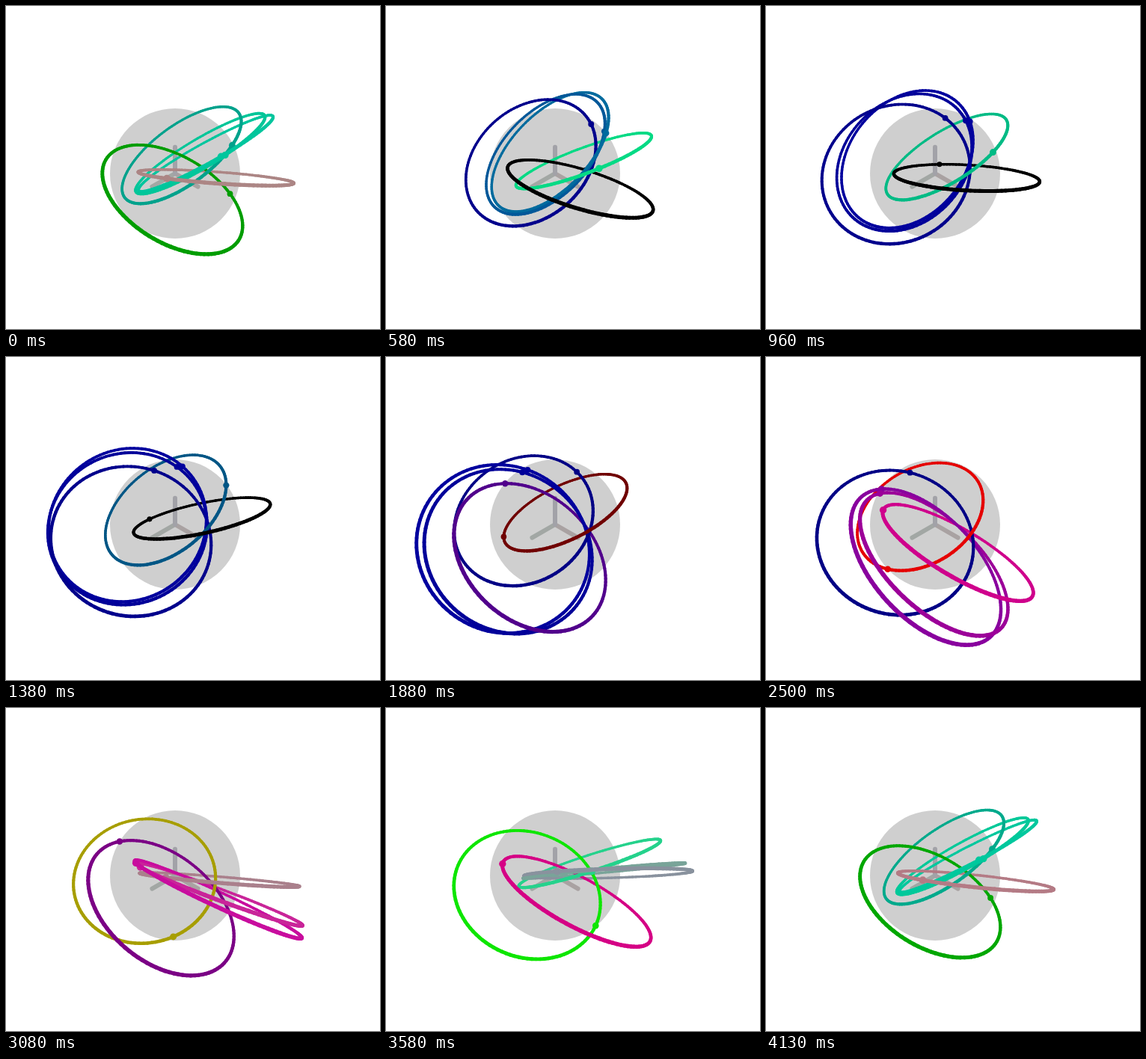
Animation of 500x432 px, one loop 4180 ms. Source, as an HTML page with a canvas:

```html
<!DOCTYPE html>
<html lang="en">
<head>
<meta charset="utf-8">
<title>Linked circles</title>
<style>
html, body { margin: 0; width: 100%; height: 100%; overflow: hidden; background: #fff; }
canvas { display: block; }
</style>
</head>
<body>
<canvas id="stage" width="500" height="432"></canvas>
<script>
const ctx = document.getElementById('stage').getContext('2d');
const LOOP = 4180, STEPS = 100, FPS = 24;
const CX = 226, CY = 224, RADIUS = 87;
const DIST = 5.5, FOCAL = RADIUS * Math.sqrt(DIST * DIST - 1);
const TUBE = 0.048, PARTS = 120;

// Start longitude in degrees and constant height of each point on the unit sphere
const points = [[137, -0.43], [38, 0.52], [130.5, 0.55], [104, 0.6], [97.3, 0.62]];
const axes = [[[0.48, 0, 0], '#a2a7a4'], [[0, 0.48, 0], '#a9a2a2'], [[0, 0, 0.48], '#a2a2a8']];

// Isometric view along (1,1,1) with perspective
function project([x, y, z]) {
  const depth = (x + y + z) / Math.sqrt(3);
  const scale = FOCAL / (DIST - depth);
  return {
    x: CX + (y - x) / Math.SQRT2 * scale,
    y: CY - (2 * z - x - y) / Math.sqrt(6) * scale,
    depth, scale
  };
}

function line(a, b, width, color) {
  ctx.strokeStyle = color;
  ctx.lineWidth = width;
  ctx.beginPath();
  ctx.moveTo(a.x, a.y);
  ctx.lineTo(b.x, b.y);
  ctx.stroke();
}

function disc(x, y, r, color) {
  ctx.fillStyle = color;
  ctx.beginPath();
  ctx.arc(x, y, r, 0, 2 * Math.PI);
  ctx.fill();
}

// Hopf fibre through m and -m: a circle of radius 1/r in the plane of m and n
function addRing(items, [start, z], turn) {
  const lon = (start + turn) * Math.PI / 180, r = Math.sqrt(1 - z * z);
  const m = [r * Math.cos(lon), r * Math.sin(lon), z];
  const n = [Math.sin(lon), -Math.cos(lon), 0];
  const color = `rgb(${m.map(v => Math.round(255 * Math.max(0, v))).join()})`;
  const at = i => {
    const a = 2 * Math.PI * i / PARTS;
    return project(m.map((v, k) => (v * Math.cos(a) + n[k] * (Math.sin(a) - z)) / r));
  };
  let a = at(0);
  for (let i = 1; i <= PARTS; i++) {
    const p = a, q = at(i);
    const width = TUBE * (p.scale + q.scale) / 2;
    items.push({ depth: (p.depth + q.depth) / 2, draw: () => line(p, q, width, color) });
    a = q;
  }
  const dot = project(m);
  items.push({ depth: dot.depth, draw: () => disc(dot.x, dot.y, TUBE * dot.scale, color) });
}

function draw(step) {
  ctx.fillStyle = '#fff';
  ctx.fillRect(0, 0, 500, 432);
  ctx.lineCap = 'round';
  disc(CX, CY, RADIUS, '#cfcfcf');
  const origin = project([0, 0, 0]);
  for (const [tip, color] of axes) line(origin, project(tip), 6, color);

  const items = [];
  for (const p of points) addRing(items, p, step * 360 / STEPS);
  items.sort((a, b) => a.depth - b.depth);
  for (const item of items) item.draw();
}

const begin = performance.now();
function tick() {
  const t = Math.max(0, performance.now() - begin) % LOOP;
  draw(Math.min(STEPS - 1, Math.floor((t + 4.9) * FPS / 1000)));
  requestAnimationFrame(tick);
}
draw(0);
requestAnimationFrame(tick);
</script>
</body>
</html>
```
